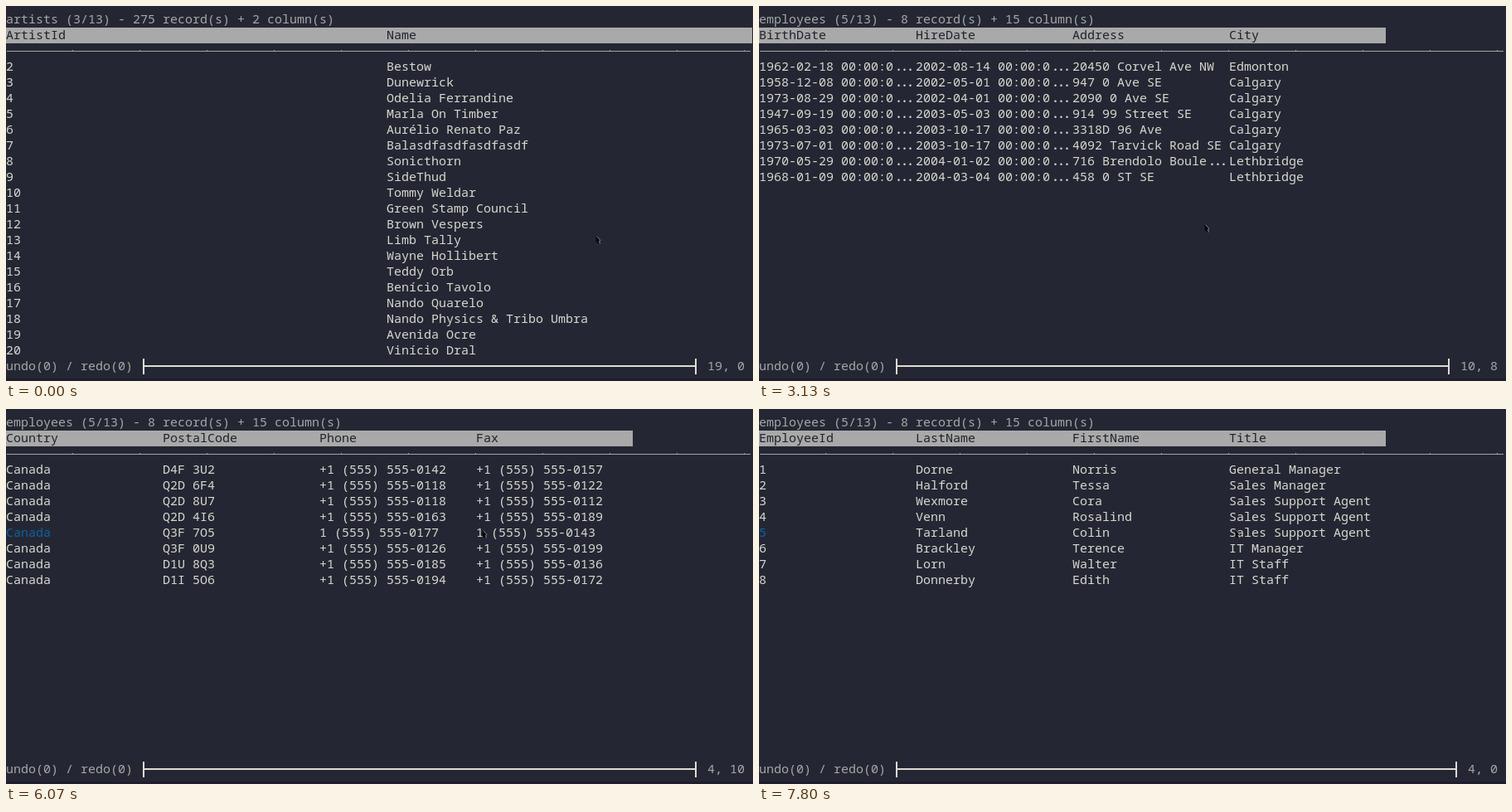
Animation, 901 px wide and 452 px high, one loop 8 s. Source, as an HTML page with a canvas:

```html
<!DOCTYPE html>
<html lang="en">
<head>
<meta charset="utf-8">
<title>Table viewer</title>
<style>
html, body { margin: 0; width: 100%; height: 100%; overflow: hidden; background: #242733; }
canvas { display: block; }
</style>
</head>
<body>
<canvas id="stage" width="901" height="452"></canvas>
<script>
const LOOP = 8000, CHAR = 9, ROW = 19, VISIBLE = 4;
const BG = '#242733', TEXT = '#d8d7cf', DIM = '#a6a7a6', BAR = '#a9a9a9', BLUE = '#0c62a3';
const ctx = document.getElementById('stage').getContext('2d');

const list = s => s.split('|');
const ids = (from, n) => Array.from({ length: n }, (_, i) => String(from + i));
const fill = (s, n) => Array(n).fill(s);
const phones = s => list(s).map((n, i) => (i === 4 ? '1' : '+1') + ' (555) 555-' + n);
const dates = s => list(s).map(d => d + ' 00:00:0~');

// A trailing "~" marks a clipped cell.
const tables = {
  artists: {
    title: 'artists (3/13) - 275 record(s) + 2 column(s)', width: 459, bar: 900,
    cols: [
      ['ArtistId', ids(2, 19)],
      ['Name', list('Bestow|Dunewrick|Odelia Ferrandine|Marla On Timber|Aurélio Renato Paz|' +
        'Balasdfasdfasdfasdf|Sonicthorn|SideThud|Tommy Weldar|Green Stamp Council|Brown Vespers|' +
        'Limb Tally|Wayne Hollibert|Teddy Orb|Benício Tavolo|Nando Quarelo|' +
        'Nando Physics & Tribo Umbra|Avenida Ocre|Vinício Dral')]
    ]
  },
  customers: {
    title: 'customers (4/13) - 59 record(s) + 13 column(s)', width: 189, bar: 756,
    cols: [
      ['CustomerId', ids(1, 19)],
      ['FirstName', list('Davi|Marthe|Gaspard|Torvin|Bohumil|Zdena|Ingrun|Joris|Maren|Gilberto|' +
        'Leopoldo|Haroldo|Valentina|Dale|Rosamund|Floyd|Ned|Gwendolen|Kip')],
      ['LastName', list('Sorvelas|Brenner|Valcourt|Lindal|Kravitelna|Dobrý|Weiler|Maessens|Sondrup|' +
        'Talheiro|Pinhal|Morvedo|Carrel|Wendle|Haverly|Strand|Crowl|Fenwick|Tolley')],
      ['Company', list('Ventara - Empresa ~|NULL|NULL|NULL|TurboKlas s.r.o.|NULL|NULL|NULL|NULL|' +
        'Pedravale Discos|Banco do Verano S.A.|Soltur|NULL|Norix|Hadley Canada|Quorbi Inc.|' +
        'Brightsum|NULL|Mulben Inc.')]
    ]
  },
  employees: {
    title: 'employees (5/13) - 8 record(s) + 15 column(s)', width: 189, bar: 756,
    cols: [
      ['EmployeeId', ids(1, 8)],
      ['LastName', list('Dorne|Halford|Wexmore|Venn|Tarland|Brackley|Lorn|Donnerby')],
      ['FirstName', list('Norris|Tessa|Cora|Rosalind|Colin|Terence|Walter|Edith')],
      ['Title', ['General Manager', 'Sales Manager', ...fill('Sales Support Agent', 3),
        'IT Manager', 'IT Staff', 'IT Staff']],
      ['ReportsTo', list('NULL|1|2|2|2|1|6|6')],
      ['BirthDate', dates('1962-02-18|1958-12-08|1973-08-29|1947-09-19|1965-03-03|1973-07-01|1970-05-29|1968-01-09')],
      ['HireDate', dates('2002-08-14|2002-05-01|2002-04-01|2003-05-03|2003-10-17|2003-10-17|2004-01-02|2004-03-04')],
      ['Address', list('20450 Corvel Ave NW|947 0 Ave SE|2090 0 Ave SE|914 99 Street SE|3318D 96 Ave|' +
        '4092 Tarvick Road SE|716 Brendolo Boule~|458 0 ST SE')],
      ['City', ['Edmonton', ...fill('Calgary', 5), 'Lethbridge', 'Lethbridge']],
      ['State', fill('AB', 8)],
      ['Country', fill('Canada', 8)],
      ['PostalCode', list('D4F 3U2|Q2D 6F4|Q2D 8U7|Q2D 4I6|Q3F 7O5|Q3F 0U9|D1U 8Q3|D1I 5O6')],
      ['Phone', phones('0142|0118|0118|0163|0177|0126|0185|0194')],
      ['Fax', phones('0157|0122|0112|0189|0143|0199|0136|0172')]
    ]
  }
};

// Time, table, selected row, selected column
const events = [
  [0, 'artists', 19, 0], [730, 'artists', 10, 1], [1200, 'customers', 10, 2], [1530, 'employees', 10, 2]
];
[2200, 2400, 2600, 2800, 2930, 3130, 3330, 3470, 3600, 3800, 4070]
  .forEach((t, i) => events.push([t, 'employees', 10, i + 3]));
events.push([4730, 'employees', 13, 13], [5130, 'employees', 4, 13]);
[5670, 5870, 6070, 6200, 6400, 6600, 6800, 6930, 7070, 7270, 7470, 7670, 7800]
  .forEach((t, i) => events.push([t, 'employees', 4, 12 - i]));

// Moments where the screen is caught half redrawn
const redraws = [{ t: 2730, end: 2800 }, { t: 3270, end: 3330, noHeader: true }, { t: 3670, end: 3735 }];

// First tick, last tick, destination of the pointer (15 ticks a second)
const moves = [
  [3, 11, 537, 263], [61, 61, 538, 306], [68, 71, 560, 313], [74, 77, 614, 150], [79, 81, 574, 146]
];

function stateAt(t) {
  let view = 0, name = '', row = 0, col = 0;
  for (const [at, table, r, c] of events) {
    if (at > t + 5) break;
    if (table !== name) view = 0;
    name = table; row = r; col = c;
    view = Math.min(Math.max(view, col - VISIBLE + 1), col);
  }
  return { table: tables[name], row, col, view };
}

function pointerAt(t) {
  const tick = Math.floor((t + 5) * 15 / 1000);
  let x = 711, y = 277;
  for (const [a, b, tx, ty] of moves) {
    const p = Math.min(1, Math.max(0, (tick - a + 1) / (b - a + 1)));
    x += (tx - x) * p;
    y += (ty - y) * p;
  }
  return [Math.round(x), Math.round(y)];
}

function text(s, x, y, color) {
  ctx.fillStyle = color;
  const clipped = s.endsWith('~');
  if (clipped) s = s.slice(0, -1);
  ctx.fillText(s, x, y);
  if (!clipped) return;
  for (let i = 0; i < 3; i++) {
    ctx.beginPath();
    ctx.arc(x + s.length * CHAR + 6.5 + i * 7, y - 1.2, 1.25, 0, 7);
    ctx.fill();
  }
}

function rect(x, y, w, h, color) {
  ctx.fillStyle = color;
  ctx.fillRect(x, y, w, h);
}

function drawRule() {
  rect(1, 54, 897, 1, '#a3a49f');
  for (let x = 80; x < 900; x += 81) rect(x, 53, 1, 2, '#a3a49f');
}

function drawStatus(row, col) {
  const pos = row + ', ' + col;
  const left = 891 - pos.length * CHAR, end = left - 14;
  text('undo(0) / redo(0)', 0, 439, DIM);
  text(pos, left, 439, DIM);
  rect(165, 425, 2, 19, '#dedcd3');
  rect(end - 1, 425, 2, 19, '#dedcd3');
  rect(166, 433, end - 166, 2, '#dedcd3');
}

function drawPointer(x, y) {
  ctx.beginPath();
  ctx.moveTo(x + .5, y);
  ctx.lineTo(x + 5.5, y + 5.5);
  ctx.lineTo(x + 3.5, y + 6);
  ctx.lineTo(x + 4.5, y + 9);
  ctx.lineTo(x + 3, y + 9.5);
  ctx.lineTo(x + 2, y + 7);
  ctx.lineTo(x + .5, y + 8.5);
  ctx.closePath();
  ctx.fillStyle = '#08080c';
  ctx.fill();
  ctx.beginPath();
  ctx.moveTo(x + 1.5, y + .5);
  ctx.lineTo(x + 6, y + 5.5);
  ctx.lineTo(x + 4.5, y + 6.5);
  ctx.lineTo(x + 5.5, y + 9.5);
  ctx.lineWidth = .7;
  ctx.strokeStyle = '#a9a9ad';
  ctx.stroke();
}

function draw(t) {
  const { table, row, col, view } = stateAt(t);
  const redraw = redraws.find(r => t + 5 >= r.t && t + 5 < r.end);
  rect(0, 0, 901, 452, BG);
  rect(0, 449, 901, 3, '#201e2c');
  ctx.font = '15px "Noto Sans Mono", "DejaVu Sans Mono", monospace';
  ctx.textBaseline = 'alphabetic';
  text(table.title, 0, 21, DIM);
  drawRule();
  const showHeader = !redraw || !redraw.noHeader;
  if (showHeader) rect(0, 26, table.bar, 19, BAR);
  table.cols.slice(view, view + VISIBLE).forEach(([head, cells], i) => {
    const x = i * table.width;
    if (showHeader) text(head, x, 40, '#20222d');
    if (redraw) return;
    cells.forEach((cell, r) => {
      text(cell, x, 78 + r * ROW, r === row && view + i === col ? BLUE : TEXT);
    });
  });
  if (!redraw) drawStatus(row, col);
  drawPointer(...pointerAt(t));
}

const start = performance.now();
function frame() {
  draw((performance.now() - start) % LOOP);
  requestAnimationFrame(frame);
}
frame();
</script>
</body>
</html>
```
